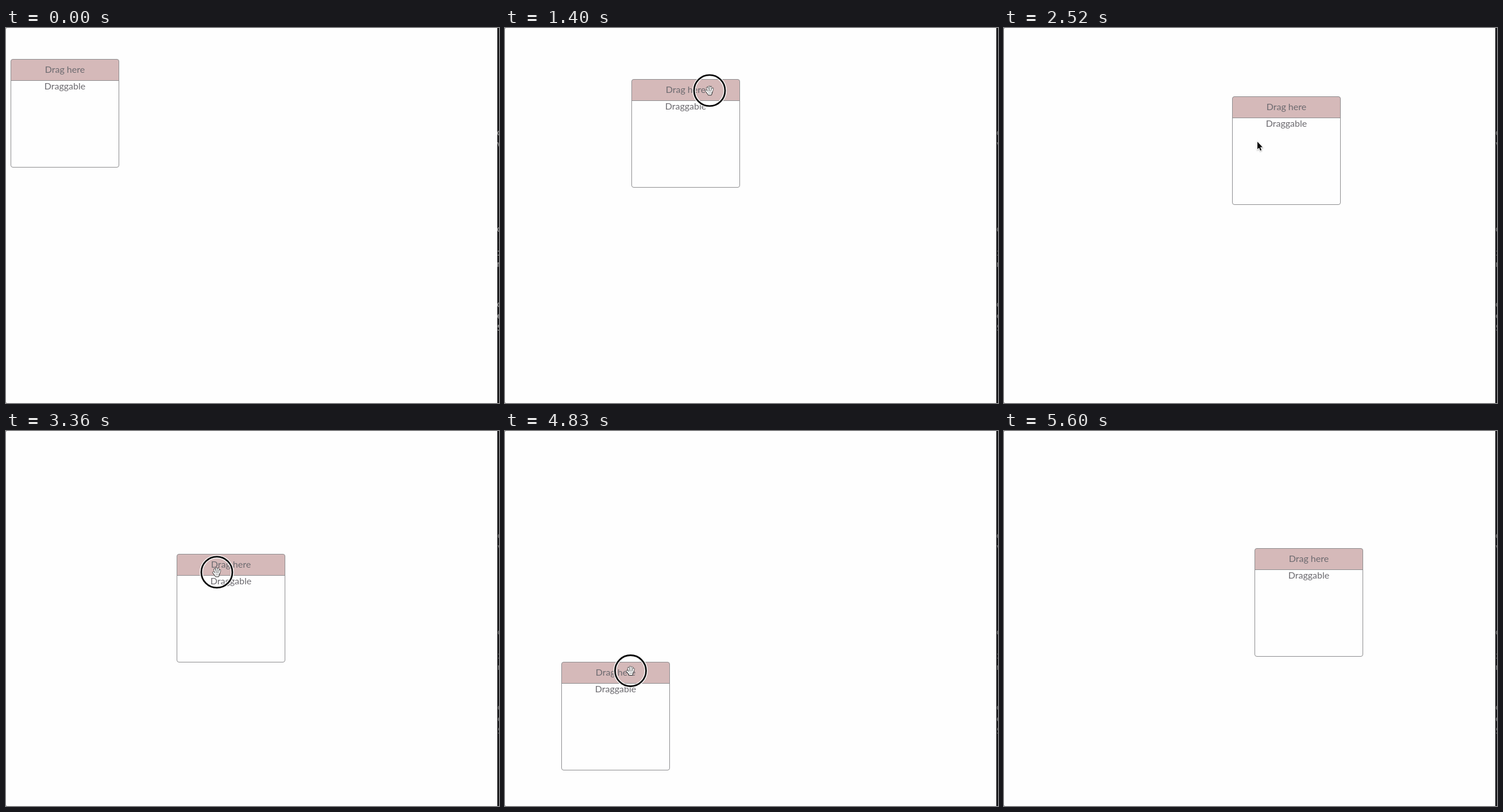
Recreate the animation shown at these times as an HTML page with a canvas. Size 858x653 px, loop 6.02 s.

```html
<!DOCTYPE html>
<html lang="en">
<head>
<meta charset="utf-8">
<title>Draggable card</title>
<style>
html, body { margin: 0; width: 100%; height: 100%; overflow: hidden; background: #fefefe; }
canvas { display: block; }
</style>
</head>
<body>
<canvas id="stage" width="858" height="653"></canvas>
<script>
const ctx = document.getElementById('stage').getContext('2d');
const W = 858, H = 653, LOOP = 6020, STEP = 70;
const SIZE = 189, HEAD = 37;
const LAG = 20;                      // the card trails the pointer a little
const SHOWN = { from: 70, to: 5600 };
const CARD = { x: 8, y: 54 };
const ENTRY = { x: 430, y: 640 };

// Pointer moves: each one eases from the previous resting place to x, y
const go = (from, to, x, y, drag = false) => ({ from, to, x, y, drag });
const moves = [
  go(70, 420, 150, 172),
  go(490, 980, 120.5, 69.5),
  go(1050, 1100, 119.5, 69.5, true),
  go(1120, 1610, 509.5, 134.5, true),
  go(1750, 2160, 222, 336),
  go(2170, 2520, 441, 198),
  go(2520, 2900, 485, 134.5),
  go(3150, 3640, 185, 417.5, true),
  go(3780, 4060, 446, 319),
  go(4270, 4690, 217.5, 417.5),
  go(4770, 4810, 218.5, 417.5, true),
  go(4830, 5180, 556.5, 219.5, true),
  go(5320, 5540, 462, 593)
];
moves.forEach((m, i) => {
  const prev = moves[i - 1] || ENTRY;
  m.dx = m.x - prev.x;
  m.dy = m.y - prev.y;
});

function ease(t, from, to) {
  const u = Math.min(1, Math.max(0, (t - from) / (to - from)));
  return u * u * (3 - 2 * u);
}

// Adds up the parts of the moves done by time t
function travel(origin, list, t) {
  let { x, y } = origin;
  for (const m of list) {
    const s = ease(t, m.from, m.to);
    x += m.dx * s;
    y += m.dy * s;
  }
  return [x, y];
}

const drags = moves.filter(m => m.drag);
const isPressed = t => drags.some(m => t >= m.from - 70 && t < m.to + 60);

function drawEdge(t) {
  const x = t < STEP ? 854.6 : 855.4;
  ctx.fillStyle = '#1c1c1e';
  ctx.fillRect(855, 0, 3, H);
  ctx.font = '14px "Noto Sans Mono", monospace';
  ctx.textAlign = 'left';
  ctx.fillStyle = t < STEP ? '#b4b4b4' : '#8c8c8c';
  for (const [y, chars] of [[187, 'ov'], [355, 'o:in'], [486, 'oe5']]) {
    [...chars].forEach((c, i) => ctx.fillText(c, x, y + i * 20.3));
  }
  ctx.fillStyle = '#8a8a8a';
  ctx.fillRect(0, 0, 1, 1);
  ctx.fillRect(0, H - 1, 1, 1);
}

function drawCard(x, y) {
  ctx.save();
  ctx.translate(x, y);
  ctx.beginPath();
  ctx.roundRect(0.5, 0.5, SIZE - 1, SIZE - 1, 3.5);
  ctx.fillStyle = '#fefefe';
  ctx.fill();
  ctx.save();
  ctx.clip();
  ctx.fillStyle = '#d5b9b9';
  ctx.fillRect(0, 0, SIZE, HEAD);
  ctx.restore();
  ctx.strokeStyle = ctx.fillStyle = '#8c8c8e';
  ctx.lineWidth = 1;
  ctx.stroke();
  ctx.fillRect(1, HEAD, SIZE - 2, 1);
  ctx.font = '16px Lato, sans-serif';
  ctx.textAlign = 'center';
  ctx.fillStyle = '#6c6a6f';
  ctx.fillText('Drag here', 94.5, 24);
  ctx.fillText('Draggable', 94.5, 53);
  ctx.restore();
}

function ring(x, y) {
  ctx.beginPath();
  ctx.arc(x, y, 27, 0, 7);
  for (const [width, color] of [[5.5, '#fff'], [2.8, '#0a0a0a']]) {
    ctx.lineWidth = width;
    ctx.strokeStyle = color;
    ctx.stroke();
  }
}

function arrow(x, y) {
  ctx.save();
  ctx.translate(x, y);
  const shape = new Path2D('M0 0V13L3 10.4L5 15.6L7.2 14.7L5 9.6L9 9.4Z');
  ctx.shadowColor = 'rgba(0,0,0,.3)';
  ctx.shadowBlur = 2;
  ctx.shadowOffsetY = 1;
  ctx.strokeStyle = '#fff';
  ctx.lineWidth = 2;
  ctx.stroke(shape);
  ctx.shadowColor = 'transparent';
  ctx.fillStyle = '#0a0a0a';
  ctx.fill(shape);
  ctx.restore();
}

function line(x1, y1, x2, y2, width, color) {
  ctx.beginPath();
  ctx.moveTo(x1, y1);
  ctx.lineTo(x2, y2);
  ctx.lineWidth = width;
  ctx.strokeStyle = color;
  ctx.stroke();
}

function finger(...ends) {
  line(...ends, 3.6, '#222');
  line(...ends, 2.3, '#fff');
}

function hand(x, y) {
  ctx.save();
  ctx.translate(x, y);
  ctx.lineCap = 'round';
  finger(-6, 0.4, -3, 4);
  for (let i = 0; i < 4; i++) {
    finger(-3.9 + 3.1 * i, -6.6 + 1.2 * (i - 1.3) ** 2, -2 + 1.9 * i, 2);
  }
  ctx.fillStyle = '#fff';
  ctx.fill(new Path2D('M-4 1.5H4.8Q4.8 5 3.2 8H-2.4Q-3.5 5.5-5.2 3.4Z'));
  ctx.lineWidth = 1;
  ctx.strokeStyle = '#222';
  ctx.stroke(new Path2D('M4.9 2.5Q4.8 5 3.2 8H-2.4Q-3.5 5.5-5.4 3.2'));
  for (let i = -1; i < 2; i++) {
    line(0.7 + 2.1 * i, 3, 0.7 + 2.1 * i, 5.4, 0.6, '#555');
  }
  ctx.restore();
}

function draw(t) {
  ctx.fillStyle = '#fefefe';
  ctx.fillRect(0, 0, W, H);
  drawEdge(t);
  const [cx, cy] = travel(CARD, drags, t - LAG).map(Math.round);
  drawCard(cx, cy);
  if (t < SHOWN.from || t >= SHOWN.to) return;
  const [x, y] = travel(ENTRY, moves, t);
  const pressed = isPressed(t);
  const onHead = x >= cx && x < cx + SIZE && y >= cy && y < cy + HEAD;
  if (pressed) ring(x, y);
  (pressed || onHead ? hand : arrow)(x, y);
}

const start = performance.now();
function tick() {
  const t = (performance.now() - start) % LOOP;
  draw(Math.floor(t / STEP) * STEP);
  requestAnimationFrame(tick);
}
tick();
</script>
</body>
</html>
```
